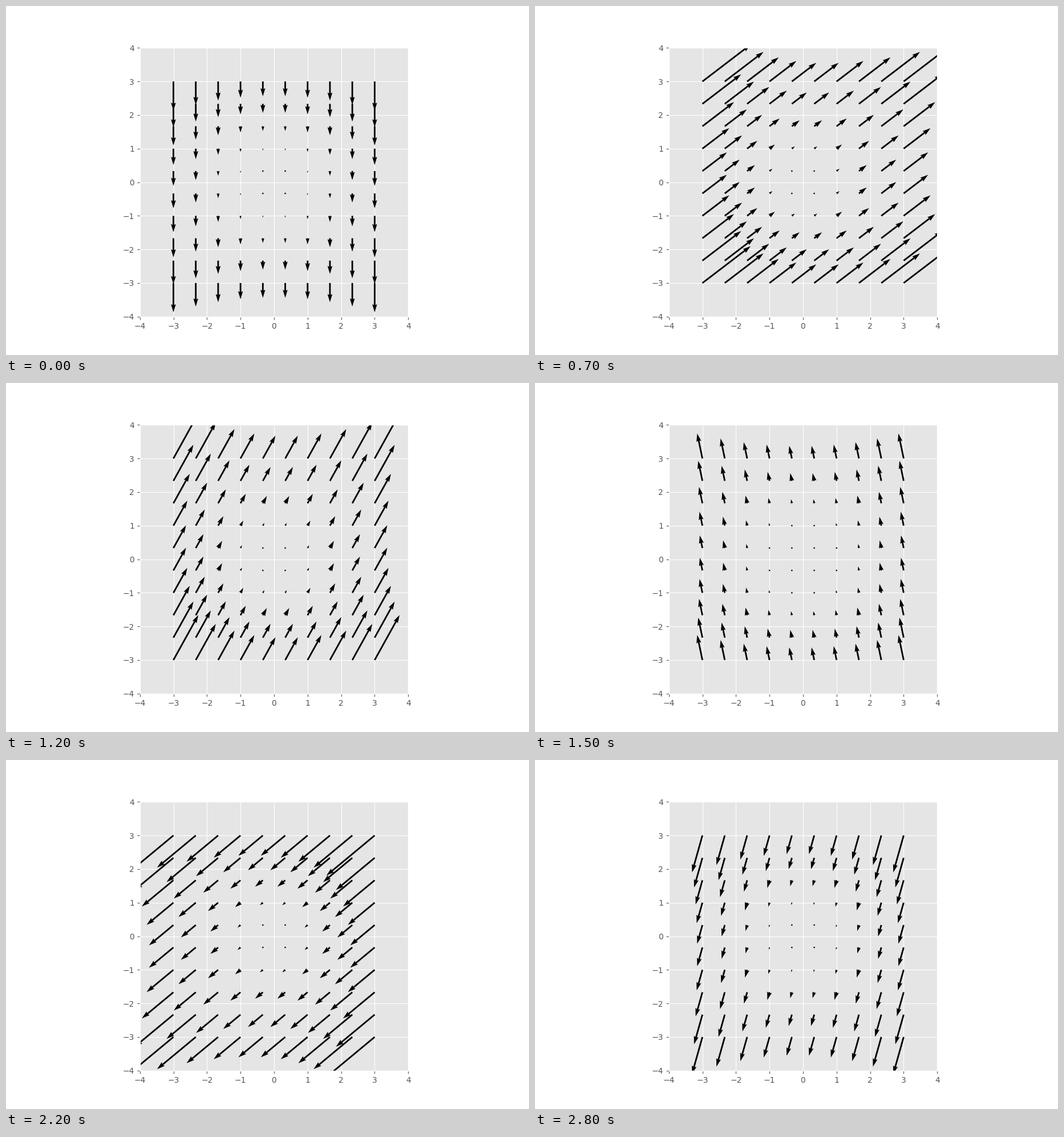
A matplotlib script for the animation above (2900 ms loop, 917 by 611 pixels).

```python
import matplotlib.pyplot as plt
import numpy as np
from matplotlib.animation import FuncAnimation

FRAMES = 29
INTERVAL = 100  # ms
LAG = 3         # steps by which the vertical component trails

plt.style.use("ggplot")

fig, ax = plt.subplots(figsize=(9.17, 6.11), dpi=100)
ax.set(xlim=(-4, 4), ylim=(-4, 4), aspect="equal",
       xticks=range(-4, 5), yticks=range(-4, 5))

axis = np.linspace(-3, 3, 10)
x, y = np.meshgrid(axis, axis)
strength = x**2 + y**2


def field(step):
    phase = 2 * np.pi / FRAMES
    u = strength * np.sin(phase * step)
    v = strength * np.sin(phase * (step - LAG))
    return u, v


arrows = ax.quiver(x, y, *field(0), scale=100, color="black")


def update(step):
    arrows.set_UVC(*field(step))
    return (arrows,)


anim = FuncAnimation(fig, update, frames=FRAMES, interval=INTERVAL,
                     repeat=True, repeat_delay=0, blit=False)
plt.show()
```
